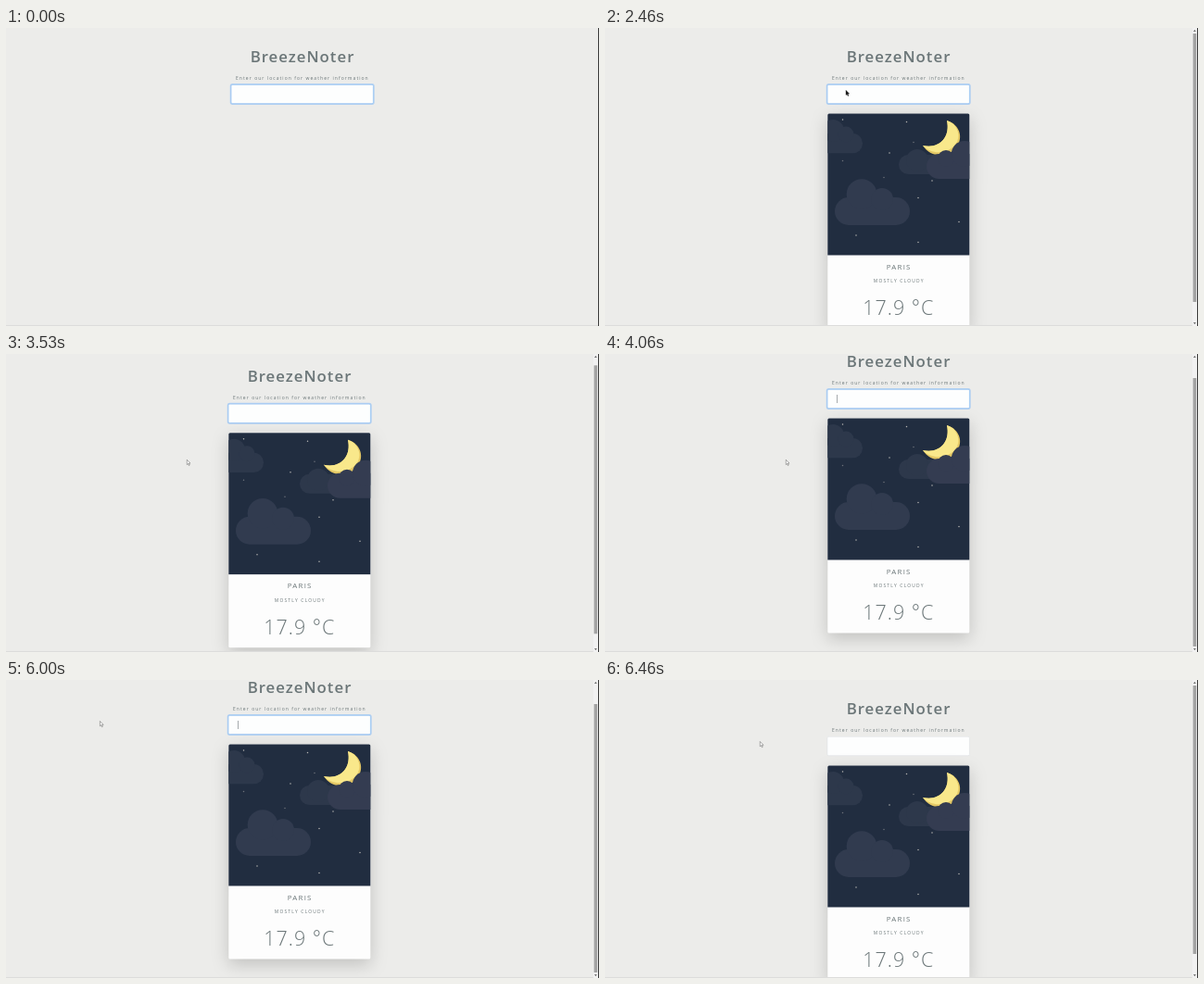
An HTML page for the animation above (6660 ms loop, 640 px wide and 322 px high).

```html
<!DOCTYPE html>
<html lang="en">
<head>
<meta charset="utf-8">
<title>Weather lookup</title>
<style>
  html, body { margin: 0; width: 100%; height: 100%; overflow: hidden; background: #ececea; }
  svg { display: block; width: 640px; height: 322px; }
  text { font-family: "Open Sans", "Noto Sans", sans-serif; fill: #6b7678; }
  .mid { text-anchor: middle; }
  #card { filter: drop-shadow(0 6px 9px rgba(0, 0, 0, .18)); }
</style>
</head>
<body>
<svg viewBox="0 0 640 322">
  <defs>
    <clipPath id="sky"><path d="M240.3 245.5V94q0-1.5 1.5-1.5h150q1.5 0 1.5 1.5v151.5z"/></clipPath>
  </defs>
  <rect width="640" height="322" fill="#ececea"/>

  <g id="page">
    <text class="mid" x="320" y="36.8" font-size="16.8" font-weight="600" letter-spacing="1">BreezeNoter</text>
    <text class="mid" x="319.9" y="55.8" font-size="5" letter-spacing="1.06">Enter our location for weather information</text>
    <rect x="243" y="61.3" width="153.4" height="20.4" rx="1.4" fill="#fdfefe" stroke="#d4d9dd" stroke-width=".4"/>
    <g id="ring" fill="none">
      <rect x="242.4" y="60.7" width="154.6" height="21.6" rx="2" stroke="#b3d0f0" stroke-width="1.4"/>
      <rect x="243" y="61.3" width="153.4" height="20.4" rx="1.4" stroke="#80bdff" stroke-width=".4"/>
    </g>
    <text id="typed" x="252.6" y="74.2" font-size="7" style="fill:#495057"></text>
    <rect id="caret" x="253" y="67" width=".6" height="9" fill="#6b7276"/>
  </g>

  <g id="result">
    <g id="card">
      <rect x="240.3" y="92.5" width="153" height="232" rx="1.5" fill="#fdfdfd"/>
      <g clip-path="url(#sky)">
        <rect x="240" y="92" width="154" height="154" fill="#212d40"/>
        <g id="stars" fill="#c9c6c0"></g>
        <g fill="#2d384b">
          <rect x="220" y="114" width="58" height="21.3" rx="10.6"/>
          <circle cx="246" cy="111" r="12"/>
          <circle cx="260" cy="115" r="8.5"/>
          <rect x="317" y="137" width="50" height="21" rx="10.5"/>
          <circle cx="337" cy="143" r="12"/>
        </g>
        <g fill="#313b4f">
          <rect x="248" y="183" width="81" height="30" rx="15"/>
          <circle cx="277" cy="179.5" r="16.3"/>
          <circle cx="299" cy="185" r="12"/>
        </g>
        <path d="M369 100C380 103 386 114 382 124C377 138 354 144 343 127C361 131 373 118 369 100Z" fill="#e3c765"/>
        <path d="M369 100C379 103 384 114 380 123C374 135 354 139 343 127C361 131 373 118 369 100Z" fill="#f9e88b"/>
        <g fill="#343c51">
          <rect x="347" y="136" width="70" height="27" rx="13.5"/>
          <circle cx="368" cy="141" r="9"/>
          <circle cx="388" cy="136" r="14"/>
        </g>
      </g>
      <text class="mid" x="317.2" y="260.5" font-size="7.9" font-weight="500" letter-spacing="1.2">PARIS</text>
      <text class="mid" x="317.3" y="275" font-size="4.9" letter-spacing="1.22">MOSTLY CLOUDY</text>
      <text class="mid" x="316.8" y="310.3" font-size="21.5" font-weight="300" letter-spacing=".98">17.9 °C</text>
    </g>
  </g>

  <rect y="321" width="640" height="1" fill="#dcdcdb"/>
  <g id="bar">
    <rect x="633.8" width="5.4" height="322" fill="#f1f1f1"/>
    <rect id="thumb" x="634.6" y="6" width="3.6" height="290" fill="#a3a3a3"/>
    <path d="M635 3.8l1.4-1.8 1.4 1.8zM635 318.2l1.4 1.8 1.4-1.8z" fill="#505050"/>
  </g>
  <rect x="639" width="1" height="322" fill="#3a3a3a"/>
  <path id="mouse" d="M0 0V5.2L1.2 4.2 2.1 6.2 2.9 5.8 2.1 3.9 3.7 3.8Z" stroke="#333" stroke-width=".4"/>
</svg>
<script>
const LOOP = 6660, CLEAR = 1930, SHOW = 2130;
const $ = id => document.getElementById(id);
const show = (el, on) => el.setAttribute('visibility', on ? 'visible' : 'hidden');
const move = (el, x, y) => el.setAttribute('transform', `translate(${x} ${y})`);

const stars = [[256.5, 99], [325.5, 101.5], [333, 123.5], [307, 135], [256.5, 143.5], [301, 161.5],
  [353, 165], [338, 183.5], [382, 209.5], [271, 224], [338, 231.5]];
$('stars').innerHTML = stars.map(([x, y], i) =>
  `<circle cx="${x}" cy="${y}" r=".75" opacity="${i === 2 || i === 4 || i === 5 ? .45 : .9}"/>`).join('');

const typing = [[0, ''], [600, 'P'], [930, 'Pa'], [1130, 'Par'], [1200, 'Pari'], [1400, 'Paris'], [CLEAR, '']];
const blink = [[0, 0], [600, 1], [2460, 0], [3000, 1], [3530, 0], [4060, 1], [4600, 0], [5070, 1], [6130, 0]];
const scrolling = [[3430, 0], [3700, 23], [6060, 23], [6300, 0]];
const mousePath = [[2570, 260, 67.3], [3260, 195.3, 114.3], [4060, 195.3, 114.3], [4660, 63, 30],
  [5700, 63, 30], [6000, 101.3, 44.5], [6330, 143, 59], [6460, 167.3, 66.5]];
const fade = [[6100, 1], [6250, 0]];

const stepAt = (table, t) => table.filter(([at]) => at <= t).pop()[1];
const smooth = p => p * p * (3 - 2 * p);

function valueAt(table, t, ease, col = 1) {
  const i = table.findIndex(([at]) => at > t);
  if (i < 0) return table[table.length - 1][col];
  if (i === 0) return table[0][col];
  const a = table[i - 1], b = table[i];
  return a[col] + (b[col] - a[col]) * ease((t - a[0]) / (b[0] - a[0]));
}

function draw(t) {
  const found = t >= SHOW;
  const scroll = valueAt(scrolling, t, smooth);
  move($('page'), found ? -3 : 0, -scroll);
  move($('result'), 0, -scroll);
  show($('result'), found);
  show($('bar'), found);
  $('thumb').setAttribute('y', 6 + scroll * 20 / 23);

  const typed = $('typed'), text = stepAt(typing, t);
  if (typed.textContent !== text) typed.textContent = text;
  $('caret').setAttribute('x', 253 + (text ? typed.getComputedTextLength() : 0));
  show($('caret'), stepAt(blink, t));
  $('ring').setAttribute('opacity', valueAt(fade, t, p => p));

  // Slow start and stop for the long moves, steady pace for the last one.
  const ease = t < 5700 ? smooth : p => p;
  const x = valueAt(mousePath, t, ease), y = valueAt(mousePath, t, ease, 2);
  move($('mouse'), x, y);
  $('mouse').setAttribute('fill', x > 240 ? '#111' : '#fff');
  show($('mouse'), t >= CLEAR);
}

const start = performance.now();
function tick() {
  draw((performance.now() - start) % LOOP);
  requestAnimationFrame(tick);
}
tick();
</script>
</body>
</html>
```
